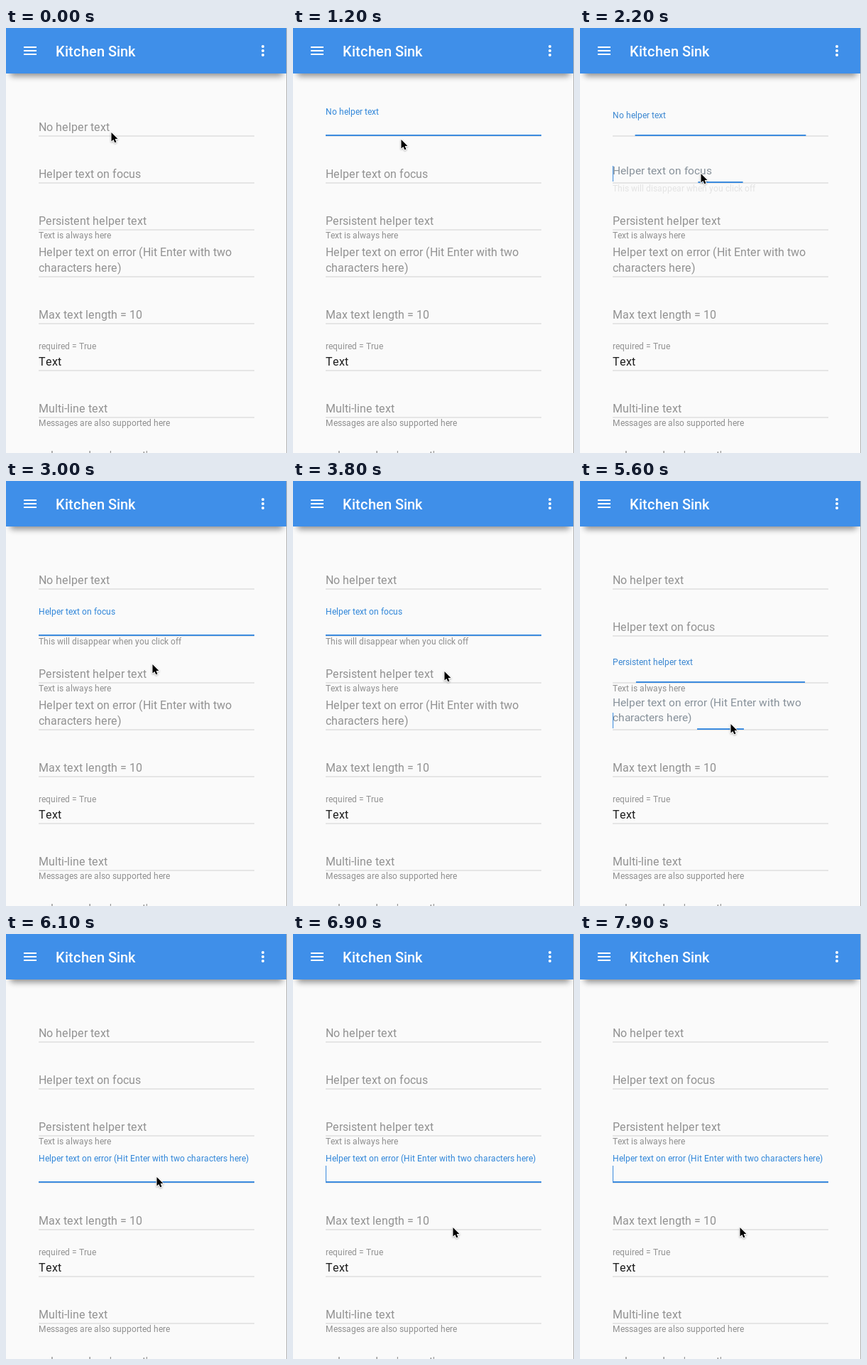
Write an HTML page that moves like this. It is 396x598 px and loops after 8000 ms.

```html
<!DOCTYPE html>
<html lang="en">
<head>
<meta charset="utf-8">
<title>Text fields</title>
<style>
  html, body { margin: 0; width: 100%; height: 100%; overflow: hidden; background: #fafafa; }
  svg { display: block; width: 396px; height: 598px; font-family: Roboto, sans-serif; }
  text { white-space: pre; }
</style>
</head>
<body>
<svg viewBox="0 0 396 598">
  <rect width="396" height="598" fill="#fafafa"/>
  <rect x="6" y="44" width="384" height="24" rx="4" opacity=".42" style="filter: blur(4px)"/>
  <g id="fields"></g>
  <rect width="396" height="64" fill="#3f8fe9"/>
  <g id="toolbar" fill="#fff">
    <path d="M25 26h18v2h-18zM25 31h18v2h-18zM25 36h18v2h-18z"/>
    <circle cx="362" cy="26" r="2"/><circle cx="362" cy="32" r="2"/><circle cx="362" cy="38" r="2"/>
  </g>
  <rect x="395" width="1" height="598" fill="#b4b4b4"/>
  <path id="cursor" d="M.5 1v12.6l2.9-2.7l1.9 4.4l2.2-.9l-1.9-4.3h3.9z" fill="#000"
        stroke="#fff" stroke-width="2" stroke-linejoin="round" paint-order="stroke"
        style="filter: drop-shadow(0 1px 1px rgba(0,0,0,.3))"/>
</svg>
<script>
const LOOP = 8000, STEP = 100, FADE = 200, BLINK = 500;
const LEFT = 46, WIDTH = 304, PITCH = 66, FIRST_LINE = 152;
const GREY = [146, 146, 146], BLUE = [48, 134, 217];
const NOTE_COLOR = "#8e8e8e", BAR_COLOR = "#3b8bdf";

const specs = [
  { hint: ["No helper text"], focus: 480, blur: 2178 },
  { hint: ["Helper text on focus"], helper: "This will disappear when you click off", fades: true, focus: 2178, blur: 3880 },
  { hint: ["Persistent helper text"], helper: "Text is always here", focus: 3880, blur: 5577 },
  { hint: ["Helper text on error (Hit Enter with two", "characters here)"], focus: 5577 },
  { hint: ["Max text length = 10"] },
  { hint: ["required = True"], value: "Text" },
  { hint: ["Multi-line text"], helper: "Messages are also supported here" },
  { hint: ["color_mode = 'accent'"] }
];

// time, x, y of the pointer tip
const path = [
  [0, 148, 146], [1100, 148, 146], [1700, 170, 204], [2500, 170, 204],
  [3000, 206, 257], [3100, 211, 265], [3200, 213, 267], [4500, 213, 267],
  [4900, 212, 325], [5100, 212, 341], [6200, 212, 341], [6700, 224, 411], [6900, 225, 412]
];

const cursor = document.getElementById("cursor");
const layer = document.getElementById("fields");
const pen = document.createElement("canvas").getContext("2d");
const mix = (a, b, k) => a + (b - a) * k;
const linear = x => Math.min(1, Math.max(0, x));
const easeOut = x => 1 - (1 - linear(x)) ** 2;

function set(node, attrs) {
  for (const key in attrs) node.setAttribute(key, attrs[key]);
}

function add(tag, attrs, parent = layer) {
  const node = document.createElementNS("http://www.w3.org/2000/svg", tag);
  set(node, attrs);
  return parent.appendChild(node);
}

// Hinted text: every glyph advances by whole pixels, with a slight upward bias.
function write(node, content, x, y, size, fill, weight = 400) {
  pen.font = `${weight} ${size}px Roboto, sans-serif`;
  const stops = [...content].map(char => {
    const stop = x;
    x += Math.round(pen.measureText(char).width + 0.05);
    return stop;
  });
  node.textContent = content;
  set(node, { x: stops.join(" "), y, fill, "font-size": size, "font-weight": weight });
  return node;
}

const fields = specs.map((spec, i) => {
  const line = FIRST_LINE + i * PITCH;
  add("rect", { x: LEFT, y: line - 1, width: WIDTH, height: 2, fill: "#e5e5e5" });
  if (spec.value) write(add("text", {}), spec.value, LEFT, line - 7, 16, "#1c1c1c");
  return {
    ...spec, line,
    labels: spec.hint.map(() => add("text", {})),
    note: spec.helper && write(add("text", {}), spec.helper, LEFT, line + 12, 12, NOTE_COLOR),
    bar: add("rect", { y: line - 2, height: 2, fill: BAR_COLOR }),
    caret: add("rect", { x: LEFT, y: line - 24, width: 1, height: 22, fill: BAR_COLOR })
  };
});

function drawField(field, time) {
  const { hint, labels, line, focus = Infinity, blur = Infinity } = field;
  const progress = ease => ease((time - focus) / FADE) - ease((time - blur) / FADE);
  const active = progress(easeOut), tint = progress(linear);
  const size = field.value ? 12 : Math.floor((16 - 4 * tint) * 2) / 2;
  const base = line - 7 - 23 * (field.value ? 1 : active);
  const fill = `rgb(${GREY.map((c, i) => Math.round(mix(c, BLUE[i], tint)))})`;

  const rows = size > 12 ? hint : [hint.join(" ")];
  labels.forEach((label, i) => {
    const above = rows.length - 1 - i;
    write(label, rows[i] || "", LEFT, base - above * Math.floor(size * 1.4), size, fill);
  });

  set(field.bar, { x: LEFT + WIDTH * (1 - active) / 2, width: WIDTH * active });
  const lit = time >= focus && time < blur && (time - focus) % (2 * BLINK) < BLINK;
  set(field.caret, { opacity: lit ? 1 : 0 });
  if (field.fades) set(field.note, { opacity: active });
}

function drawCursor(time) {
  const next = path.findIndex(p => p[0] > time);
  const b = path[next < 0 ? path.length - 1 : next];
  const a = next < 0 ? b : path[next - 1];
  const k = a === b ? 0 : (time - a[0]) / (b[0] - a[0]);
  const [x, y] = [1, 2].map(i => Math.round(mix(a[i], b[i], k)));
  set(cursor, { transform: `translate(${x} ${y})` });
}

write(add("text", {}, document.getElementById("toolbar")), "Kitchen Sink", 70, 40, 20, "#fff", 500);

const start = performance.now();
function frame() {
  const time = Math.floor((performance.now() - start) % LOOP / STEP) * STEP;
  fields.forEach(field => drawField(field, time));
  drawCursor(time);
  requestAnimationFrame(frame);
}
frame();
</script>
</body>
</html>
```
